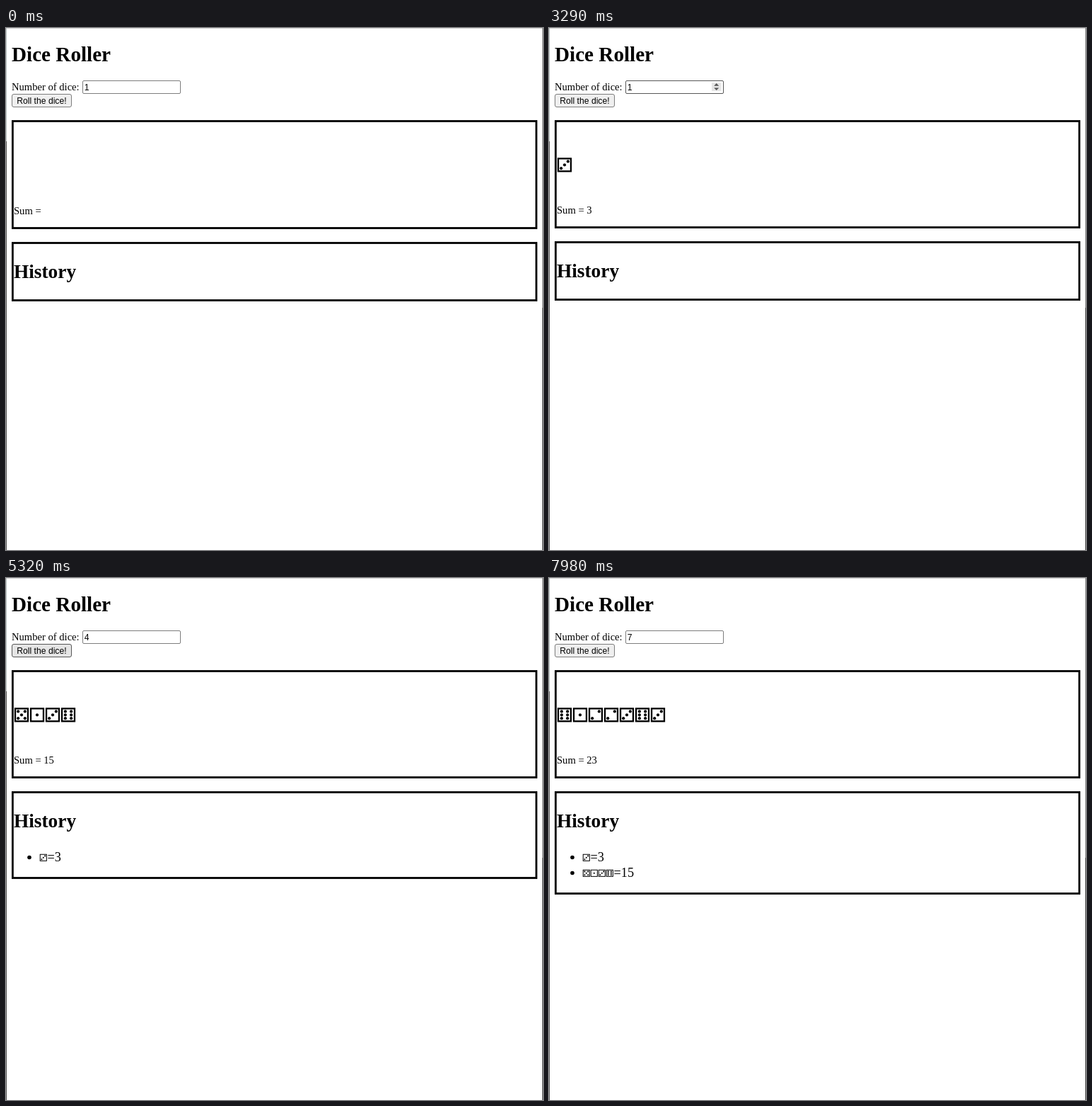
Animation of 759x737 px, one loop 8000 ms. Source, as an HTML page with a canvas:

```html
<!DOCTYPE html>
<html lang="en">
<head>
<meta charset="utf-8">
<title>Dice Roller</title>
<style>
html, body { margin: 0; width: 100%; height: 100%; overflow: hidden; background: #fff; }
canvas { display: block; }
</style>
</head>
<body>
<canvas id="stage" width="759" height="737"></canvas>
<script>
const ctx = document.getElementById('stage').getContext('2d');
const LOOP = 8000;
const SERIF = '"Liberation Serif", "Times New Roman", serif';
const SANS = '"Liberation Sans", Arial, sans-serif';

const BUTTON = {
  normal: ['#efefef', '#767676'],
  hover: ['#e5e5e5', '#4f4f4f'],
  active: ['#f5f5f5', '#8d8d8d'],
};

const INITIAL = {
  button: 'normal', field: 'normal', spinner: 'hidden',
  value: 1, caret: false, dice: [], history: [],
};

// Each entry changes part of the page state from its time (ms) onward.
const TIMELINE = [
  [2380, { button: 'active' }],
  [2520, { button: 'hover', dice: [3] }],
  [2870, { button: 'normal' }],
  [3220, { field: 'hover', spinner: 'idle' }],
  [3290, { spinner: 'hover' }],
  [3990, { field: 'focus', spinner: 'pressed', value: 2, caret: true }],
  [4130, { spinner: 'hover' }],
  [4200, { spinner: 'pressed', value: 3 }],
  [4270, { spinner: 'hover' }],
  [4340, { spinner: 'pressed', value: 4 }],
  [4480, { spinner: 'hover' }],
  [4620, { spinner: 'idle' }],
  [4830, { caret: false }],
  [4900, { button: 'hover' }],
  [5180, { button: 'active', field: 'normal', spinner: 'hidden' }],
  [5320, { button: 'hover', dice: [5, 1, 3, 6], history: [[3]] }],
  [5880, { button: 'normal' }],
  [6300, { field: 'hover', spinner: 'idle' }],
  [6510, { spinner: 'hover' }],
  [6860, { field: 'focus', spinner: 'pressed', value: 5, caret: true }],
  [6930, { spinner: 'hover' }],
  [7000, { spinner: 'pressed', value: 6 }],
  [7070, { spinner: 'hover' }],
  [7140, { spinner: 'pressed', value: 7 }],
  [7280, { spinner: 'hover' }],
  [7350, { spinner: 'idle' }],
  [7490, { button: 'hover' }],
  [7700, { button: 'active', field: 'normal', spinner: 'hidden', caret: false }],
  [7840, { button: 'hover', dice: [6, 1, 2, 2, 3, 6, 3], history: [[3], [5, 1, 3, 6]] }],
  [7980, { button: 'normal' }],
];

const stateAt = time => Object.assign({}, INITIAL,
  ...TIMELINE.filter(([start]) => start <= time).map(([, change]) => change));

const sum = dice => dice.reduce((a, b) => a + b, 0);

function rect(x, y, w, h, color) {
  ctx.fillStyle = color;
  ctx.fillRect(x, y, w, h);
}

function text(str, x, y, font) {
  ctx.fillStyle = '#000';
  ctx.font = font;
  ctx.fillText(str, x, y);
}

function dot(x, y, r) {
  ctx.beginPath();
  ctx.arc(x, y, r, 0, Math.PI * 2);
  ctx.fill();
}

function roundBox(x, y, w, h, r, fill, stroke, line) {
  ctx.beginPath();
  ctx.roundRect(x, y, w, h, r);
  ctx.fillStyle = fill;
  ctx.fill();
  ctx.strokeStyle = stroke;
  ctx.lineWidth = line;
  ctx.stroke();
}

function panel(top, bottom) {
  ctx.strokeStyle = '#000';
  ctx.lineWidth = 2.8;
  ctx.strokeRect(9.4, top + 1.5, 740.2, bottom - top - 3);
}

// Pip offsets from the centre, in units of the pip spacing.
function pips(n) {
  const list = [];
  if (n % 2) list.push([0, 0]);
  if (n > 1) list.push([-1, 1], [1, -1]);
  if (n > 3) list.push([-1, -1], [1, 1]);
  if (n === 6) list.push([-1, 0], [1, 0]);
  return list;
}

function diceRow(dice, x, cy, pitch, line) {
  const size = pitch * 0.92 - line;
  const gap = pitch * 0.22;
  dice.forEach((n, i) => {
    const cx = x + pitch * (i + 0.5);
    ctx.strokeStyle = ctx.fillStyle = '#000';
    ctx.lineWidth = line;
    ctx.strokeRect(cx - size / 2, cy - size / 2, size, size);
    const gapX = n === 6 ? gap * 0.85 : gap;
    for (const [px, py] of pips(n)) dot(cx + px * gapX, cy + py * gap, pitch * 0.095);
  });
}

function arrow(x, base, rise, color) {
  ctx.fillStyle = color;
  ctx.beginPath();
  ctx.moveTo(x - 3.5, base);
  ctx.lineTo(x + 3.5, base);
  ctx.lineTo(x, base + rise);
  ctx.fill();
}

function drawSpinner(mode) {
  if (mode === 'hidden') return;
  if (mode !== 'idle') rect(230, 77, 13.5, 12, '#e6e6e6');
  const pressed = mode === 'pressed';
  if (pressed) rect(230, 77, 13.5, 6, '#999');
  arrow(236.7, 81.7, -3.6, pressed ? '#fff' : '#555');
  arrow(236.7, 84.4, 3.6, '#555');
}

function drawField(s) {
  if (s.field === 'focus') {
    roundBox(108.8, 74.8, 137.4, 17.2, 2, '#fff', '#5674ad', 1.8);
  } else {
    const border = s.field === 'hover' ? '#4f4f4f' : '#767676';
    roundBox(108.5, 74.5, 138, 18, 1.5, '#fff', border, 0.95);
  }
  text(s.value, 110.8, 87.5, '12.16px ' + SANS);
  if (s.caret) rect(118, 77, 1, 12.5, '#000');
  drawSpinner(s.spinner);
}

function drawEdges() {
  rect(0, 0, 759, 1, '#d4d4d4');
  rect(0, 0, 1, 160, '#bcc4c4');
  rect(0, 160, 1, 577, '#555');
  rect(758, 0, 1, 395, '#858585');
  rect(758, 395, 1, 342, '#444');
}

function draw(time) {
  const s = stateAt(time);
  const rolled = s.dice.length > 0;
  const shift = rolled ? 0 : 1;
  const body = '14.6px ' + SERIF;
  rect(0, 0, 759, 737, '#fff');
  drawEdges();

  text('Dice Roller', 8, 47, 'bold 29.17px ' + SERIF);
  text('Number of dice:', 8, 88, body);
  drawField(s);
  roundBox(8.5, 93.5, 84, 18, 2.5, ...BUTTON[s.button], 0.95);
  text('Roll the dice!', 15.3, 107, '12.16px ' + SANS);

  panel(130, 283 + shift);
  diceRow(s.dice, 11, 193.3, 22, 2.3);
  text('Sum =' + (rolled ? ' ' + sum(s.dice) : ''), 11, 262 + shift, body);

  const rows = s.history.length;
  panel(301 + shift, 385 + shift + (rows ? 18 + 22 * rows : 0));
  text('History', 11, 352 + shift, 'bold 27.35px ' + SERIF);
  s.history.forEach((dice, i) => {
    const y = 394.5 + 22 * i;
    ctx.fillStyle = '#000';
    dot(33, y, 2.8);
    diceRow(dice, 47.3, y + 0.3, 11, 1);
    text('=' + sum(dice), 47.5 + 11 * dice.length, y + 5.5, '18.24px ' + SERIF);
  });
}

function frame() {
  draw(performance.now() % LOOP);
  requestAnimationFrame(frame);
}
frame();
</script>
</body>
</html>
```
